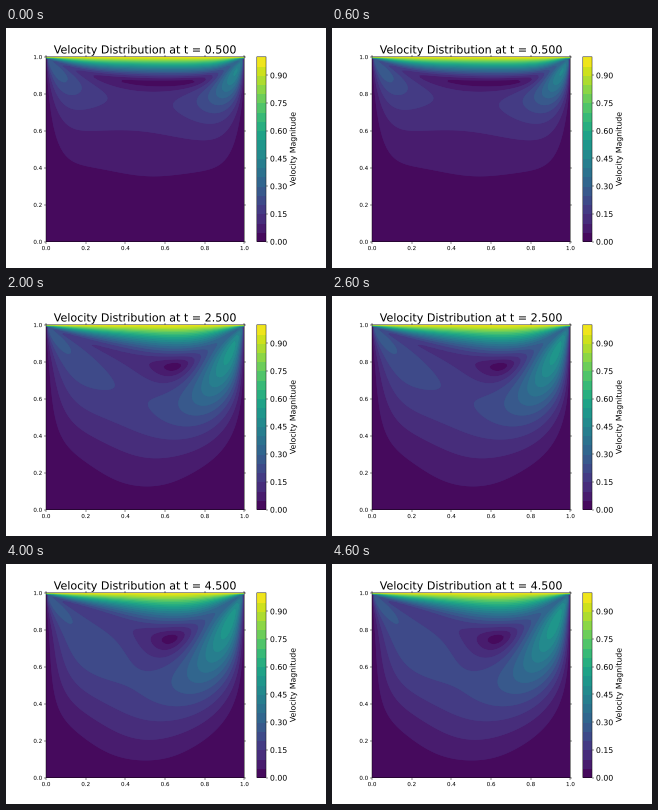
Animation of 320 by 240 pixels, one loop 5000 ms. Source, as a matplotlib script:

```python
import numpy as np
import matplotlib.pyplot as plt
from matplotlib.animation import FuncAnimation
from matplotlib.patheffects import Normal
from matplotlib.text import Text

# Unsnapped lines and unhinted text keep sub-pixel positions
plt.rcParams.update({
    "font.family": "DejaVu Sans",
    "text.hinting": "none",
    "path.snap": False,
})

# Lid-driven cavity, streamfunction-vorticity form
N = 80
H = 1 / N
NU = 0.01
LID = 1.0
DT = 0.001
LEAD = 0.01  # the flow runs one output step ahead of the printed time
TIMES = [0.5 + k for k in range(5)]

k = np.arange(1, N)
SINES = np.sin(np.pi * np.outer(k, k) / N)
EIG = (2 - 2 * np.cos(np.pi * k / N)) / H**2
KERNEL = (2 / N) ** 2 / (EIG[:, None] + EIG[None, :])


def solve_psi(w):
    psi = np.zeros_like(w)
    psi[1:-1, 1:-1] = SINES @ ((SINES @ w[1:-1, 1:-1] @ SINES) * KERNEL) @ SINES
    return psi


def ddx(f):
    return (f[1:-1, 2:] - f[1:-1, :-2]) / (2 * H)


def ddy(f):
    return (f[2:, 1:-1] - f[:-2, 1:-1]) / (2 * H)


def step(w):
    psi = solve_psi(w)
    w[0] = -2 * psi[1] / H**2
    w[-1] = -2 * (psi[-2] + H * LID) / H**2
    w[:, 0] = -2 * psi[:, 1] / H**2
    w[:, -1] = -2 * psi[:, -2] / H**2
    lap = (w[2:, 1:-1] + w[:-2, 1:-1] + w[1:-1, 2:] + w[1:-1, :-2]
           - 4 * w[1:-1, 1:-1]) / H**2
    advect = ddy(psi) * ddx(w) - ddx(psi) * ddy(w)
    w[1:-1, 1:-1] += DT * (NU * lap - advect)


def speed(w):
    psi = solve_psi(w)
    s = np.zeros_like(w)
    s[1:-1, 1:-1] = np.hypot(ddy(psi), ddx(psi))
    s[-1] = LID
    return np.clip(s, 0, LID)


def simulate():
    w = np.zeros((N + 1, N + 1))
    done, fields = 0, []
    for t in TIMES:
        target = round((t + LEAD) / DT)
        for _ in range(target - done):
            step(w)
        done = target
        fields.append(speed(w))
    return fields


fig, ax = plt.subplots(figsize=(8, 6), dpi=40)
grid = np.linspace(0, 1, N + 1)
levels = np.linspace(0, 1, 21)


def fill(field, smooth):
    return ax.contourf(grid, grid, field, levels=levels, cmap="viridis",
                       antialiased=smooth)


# A smooth layer over a hard one hides the seams between bands
layers = [(fill(f, False), fill(f, True)) for f in simulate()]

bar = fig.colorbar(layers[0][0], ax=ax)
bar.set_label("Velocity Magnitude", fontsize=14)
bar.ax.tick_params(labelsize=14)
ax.set(xlim=(0, 1), ylim=(0, 1))
ax.tick_params(top=True, right=True)
title = ax.set_title("", fontsize=20)


def update(i):
    for j, pair in enumerate(layers):
        for layer in pair:
            layer.set_visible(i == j)
    title.set_text(f"Velocity Distribution at t = {TIMES[i]:.3f}")
    return [title]


update(0)
fig.canvas.draw()
# A path effect makes the text render as outlines
for text in fig.findobj(Text):
    text.set_path_effects([Normal()])

anim = FuncAnimation(fig, update, frames=len(TIMES), interval=1000,
                     repeat=True, repeat_delay=0, blit=False)
plt.show()
```
